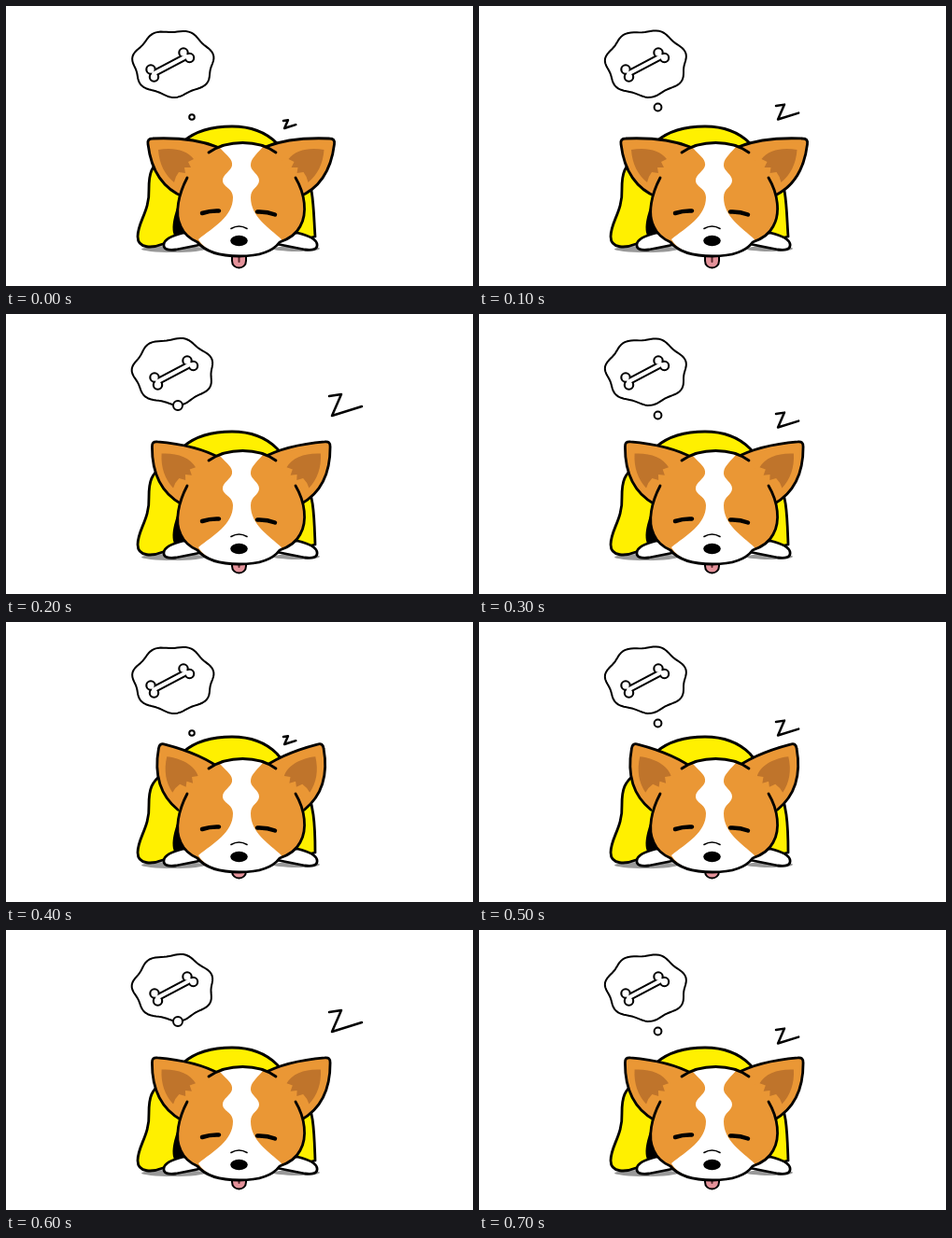
Animation, 500 px wide and 300 px high, one loop 800 ms. Source, as an HTML page:

```html
<!DOCTYPE html>
<html>
<head>
<meta charset="utf-8">
<title>Sleeping puppy</title>
<style>
html, body { margin: 0; height: 100%; overflow: hidden; background: #fff; }
svg { display: block; width: 500px; height: 300px; }
.line { fill: none; stroke: #000; stroke-width: 2.8; stroke-linecap: round; stroke-linejoin: round; }
.thin { stroke-width: 2; }
.white { fill: #fff; }
.fur { fill: #ea9735; }
.inner { fill: #bf742b; }
</style>
</head>
<body>
<svg viewBox="0 0 500 300">
  <defs>
    <g id="ear">
      <path class="line fur" d="M226 151C206 143 180 141 157 142Q151 142 152 148C155 173 166 195 191 205"/>
      <path class="inner" d="M163 154C178 151 194 154 201 164L195 167L198 173L191 173L192 179L185 178Q181 183 180 189C170 181 164 169 163 154Z"/>
    </g>
    <path id="paw" class="line white" d="M190 243C182 245 170 249 169 255C168 261 174 262 182 261L212 255L205 243Z"/>
    <path id="shaft" d="M158 72.500L193 54"/>
    <path id="knobs" d="M155 68V68M158.500 76V76M190 50V50M196.500 55.500V55.500"/>
  </defs>

  <g fill="#999">
    <ellipse cx="179" cy="260.500" rx="34" ry="3.500"/>
    <ellipse cx="311" cy="260" rx="25" ry="3"/>
  </g>
  <path id="body" class="line" style="fill:#fff000"/>
  <path d="M187 208C181 218 175 240 181 247L192 243Z"/>
  <use href="#paw"/>
  <use href="#paw" transform="translate(502) scale(-1 1)"/>
  <g id="tongue">
    <path class="line thin" style="fill:#e4929a" d="M242 262V273C242 283 257 283 257 273V262Z"/>
    <path class="line thin" style="stroke:#5a2a2e" d="M249.500 262V274"/>
  </g>
  <g id="earL"><use href="#ear"/></g>
  <g transform="translate(503.500) scale(-1 1)"><g id="earR"><use href="#ear"/></g></g>

  <path class="fur" d="M217 157C237 143 270 143 289 157L310 184C320 201 323 222 315 236C311 244 302 250 293 253C285 264 268 268 250 268C232 268 214 264 205 253C198 250 191 245 187 236C180 222 185 201 194 184Z"/>
  <path class="white" d="M229 152C237 161 243 164 242 171C241 177 232 180 232 187C232 194 243 195 243 205C243 226 222 237 206 250C214 264 232 268 250 268C268 268 286 264 295 250C281 237 262 226 262 205C262 195 271 194 271 187C271 180 262 177 262 171C262 164 266 161 275 151C261 146 243 146 229 152Z"/>
  <path class="line" d="M217 157C237 143 270 143 289 157"/>
  <path class="line" d="M194 184C185 201 180 222 187 236C191 245 198 250 205 253C214 264 232 268 250 268C268 268 285 264 293 253C302 250 311 244 315 236C323 222 320 201 310 184"/>
  <path class="line" style="stroke-width:4.500" d="M210 222Q219 219 228 219.500M269 220.500Q279 220 288 223.500"/>
  <path class="line" style="stroke-width:1.600" d="M241 238.500Q249.500 233.500 258 238.500"/>
  <ellipse cx="249.500" cy="251.500" rx="9.300" ry="5.700"/>

  <path id="bubble" class="line white thin"/>
  <g id="bone" fill="none" stroke-linecap="round">
    <g stroke="#000">
      <use href="#shaft" stroke-width="8"/><use href="#knobs" stroke-width="11.500"/>
    </g>
    <g stroke="#fff">
      <use href="#shaft" stroke-width="3.800"/><use href="#knobs" stroke-width="7.300"/>
    </g>
  </g>
  <circle id="puff" class="line white thin"/>
  <path id="zed" class="line" style="stroke-width:2.500"/>
</svg>
<script>
const set = (id, attrs) => {
  for (const k in attrs) document.getElementById(id).setAttribute(k, attrs[k]);
};

// Oval with seven soft lobes, one of them peaking at the given angle
function lobes(peak) {
  const pts = [];
  for (let a = 0; a < 360; a += 4) {
    const t = a * Math.PI / 180;
    const r = 1 + .045 * Math.cos(7 * (t - peak * Math.PI / 180));
    pts.push([179 + 42.5 * r * Math.cos(t), 61.5 + 35 * r * Math.sin(t)]);
  }
  return `M${pts.join('L')}Z`;
}

function draw(now) {
  const step = Math.floor(now / 100) % 8;
  const wave = n => 2 - Math.abs(n % 4 - 2);
  const d = wave(step);           // dream: rising z and puff
  const p = wave(step >> 1);      // breath: ears, back and tongue
  const top = 129 - 3 * p;

  set('bubble', { d: lobes(-66 - 4 * d) });
  set('bone', { transform: `translate(${2 * d})` });
  set('puff', { cx: 199 - 7.5 * d, cy: 119 - 10.5 * d, r: 2.8 + 1.1 * d });

  const s = .38 + .31 * d;
  const x = 297 + 17.5 * d + 3.5 * d * d, y = 123 - 14.5 * d - 1.5 * d * d;
  set('zed', { d: `M${x} ${y}l${13 * s} ${-2 * s}l${-10 * s} ${23 * s}l${32 * s} ${-10 * s}` });

  set('body', { d: `M186 250L168 255C158 259 141 261 141 247C141 231 154 220 153 196
    C153 179 155 172 170 160L190 ${top + 16}C204 ${top + 4} 222 ${top} 242 ${top}
    C262 ${top} 278 ${top + 6} 290 ${top + 18}L318 175C330 190 ${329 + p} 220 331 247L300 255Z` });
  set('tongue', { transform: `translate(0 ${-3 * p})` });
  const tilt = 6 * p + p * p * 1.25;
  for (const id of ['earL', 'earR']) set(id, { transform: `rotate(${tilt} 200 180)` });
}

function tick(now) {
  draw(now);
  requestAnimationFrame(tick);
}
draw(0);
requestAnimationFrame(tick);
</script>
</body>
</html>
```
